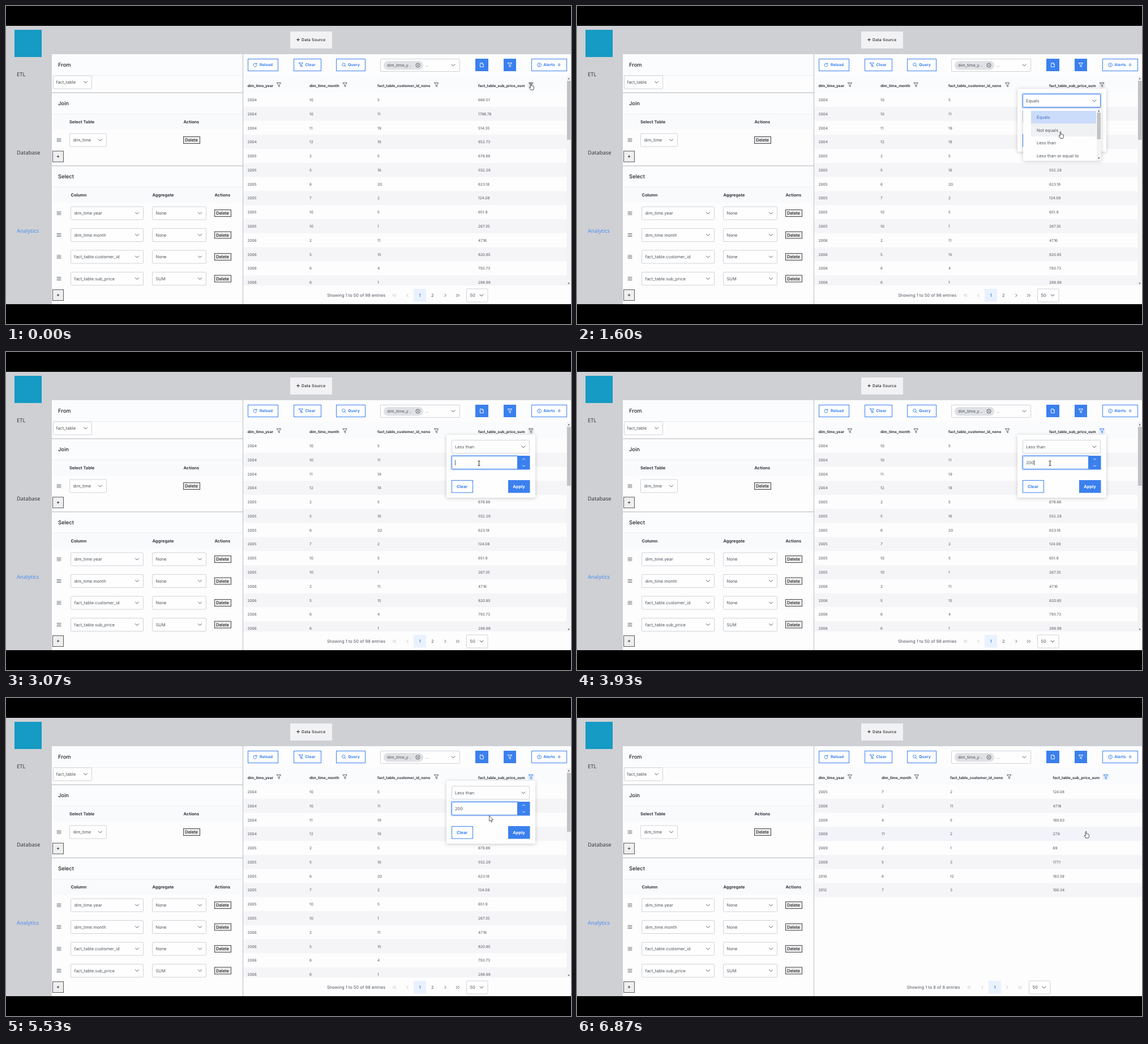
These frames come from a looping animation (998 by 561 pixels, 6.94 s). An HTML page:

```html
<!DOCTYPE html>
<html lang="en">
<head>
<meta charset="utf-8">
<title>Query builder</title>
<style>
html, body { margin: 0; width: 100%; height: 100%; overflow: hidden; background: #000; }
svg { display: block; width: 100vw; height: 100vh; font-family: Inter, sans-serif; text-rendering: geometricPrecision; }
text { white-space: pre; }
.side { font-family: "Noto Sans", sans-serif; }
.shade { filter: drop-shadow(0 1px 3px #0003); }
</style>
</head>
<body>
<svg viewBox="0 0 998 561"><g id="base"></g><g id="live"></g></svg>
<script>
const LOOP = 6940, FPS = 15;
const BLUE = '#3b80ee', INK = '#50565d', DARK = '#343a40', EDGE = '#d0d3d8';

// y is the middle of the capitals
const text = (x, y, s, size = 7.5, fill = INK, weight = 400, more = '') =>
  `<text x="${x}" y="${y + size * .36}" font-size="${size}" fill="${fill}" font-weight="${weight}" ${more}>${s}</text>`;
const bold = (x, y, s, size = 7.4, fill = DARK) => text(x, y, s, size, fill, 700);
const box = (x, y, w, h, fill, stroke = 'none', rx = 0, lw = 1) =>
  `<rect x="${x}" y="${y}" width="${w}" height="${h}" rx="${rx}" fill="${fill}" stroke="${stroke}" stroke-width="${lw}"/>`;
const line = (x, y, d, stroke = INK, lw = 1, fill = 'none') =>
  `<path transform="translate(${x} ${y})" d="${d}" fill="${fill}" stroke="${stroke}" stroke-width="${lw}" stroke-linejoin="round" stroke-linecap="round"/>`;
const ring = (x, y, r, stroke, lw = .9) => `<circle cx="${x}" cy="${y}" r="${r}" fill="none" stroke="${stroke}" stroke-width="${lw}"/>`;
const chevron = (x, y, c = INK) => line(x, y, 'M-3-1.5L0 1.5L3-1.5', c);
const funnel = (x, y, c = INK) => line(x, y, 'M-3.5-3.5H3.5L1 0V3.5L-1 2.4V0Z', c, .9);
const triangle = (x, y, s) => line(x, y, `M-1.6 ${s}H1.6L0 ${-s}Z`, 'none', 0, '#555');
const arrows = (x, y, dir, count, c) =>
  [...Array(count)].map((_, i) => line(x + (count > 1 ? i * 3.2 - 1.6 : 0), y, `M${-dir}-2.3L${dir} 0L${-dir} 2.3`, c, .9)).join('');
const select = (x, y, w, s, pad = 6.5, fill = '#fefefe') =>
  box(x + .5, y - 11.5, w - 1, 23, fill, EDGE, 1.5) + text(x + pad, y, s) + chevron(x + w - 11.5, y);
const remove = (x, y) => box(x + .5, y - 6, 29, 12, '#ececed', '#44474b') + text(x + 3, y, 'Delete', 7.5, '#222', 500);
const plus = y => box(82.5, y - 9.5, 19, 19, '#efeff0', '#55585c') + line(92, y, 'M-1.8 0H1.8M0-1.8V1.8', '#222', .9);
const grip = y => line(93.5, y, 'M-3.5-2.5H3.5M-3.5 0H3.5M-3.5 2.5H3.5', '#555b62', .9);
const button = (x, w, s, pad) => box(x + .5, 93.5, w, 21, '#fefefe', BLUE) + bold(x + pad, 103.7, s, 6.9, BLUE);

function sidebar() {
  return box(0, 35, 998, 491, '#cfd0d4') +
    box(15, 42, 48, 48, '#159bc4') +
    [['ETL', 121, '#35383c'], ['Database', 258.5, '#35383c'], ['Analytics', 397, '#4c8df0']]
      .map(([s, y, c]) => text(19, y, s, 9.4, c, 400, 'class="side"')).join('') +
    box(502, 45, 74, 30, '#f2f2f5') + line(516, 59.5, 'M-2.4 0H2.4M0-2.4V2.4', '#222') +
    text(522, 59.7, 'Data Source', 6.8, '#222', 500, 'letter-spacing=".25"');
}

function builder() {
  const sections = [['From', 86, 153], ['Join', 154, 282], ['Select', 283, 526]].map(([s, top, end]) =>
    box(83, top + 1, 334, 35, '#fbfcfd') + box(83, top + 36, 334, .8, '#e8ecf0') +
    text(92, top + 17.5, s, 9.3, '#222', 500) + (end < 526 ? box(81, end - .5, 337, 1, '#aeb1b5') : '')).join('');
  const columns = [['dim_time.year', 'None'], ['dim_time.month', 'None'], ['fact_table.customer_id', 'None'], ['fact_table.sub_price', 'SUM']];
  return box(81, 85, 917, 441, '#fdfdfe') + sections +
    select(83, 134.5, 69, 'fact_table', 5.5) +
    box(83, 191, 334, 27, '#f9fafc') + bold(112, 204.3, 'Select Table') + bold(313.5, 204.3, 'Actions') +
    grip(236.5) + select(112, 236.5, 66, 'dim_time') + remove(313, 236.5) + plus(265.5) +
    box(83, 320, 334, 27, '#f9fafc') + bold(114.5, 333.3, 'Column') + bold(258.5, 333.3, 'Aggregate') + bold(368.5, 333.3, 'Actions') +
    columns.map(([name, agg], i) => {
      const y = 365.5 + i * 38.5;
      return grip(y) + select(114, y, 129, name) + select(258, y, 96, agg) + remove(368, y);
    }).join('') + plus(510) + box(418, 85, 1, 441, '#b9bcc0');
}

function toolbar() {
  return button(427, 53, 'Reload', 21) + line(440, 104, 'M2.6-1.4A3 3 0 1 0 2.9 1M2.8-3.2V-1.2H.8', BLUE) +
    button(508, 48, 'Clear', 20.5) + funnel(521, 103.7, BLUE) + line(521, 103.7, 'M-3.5-3.5L3.5 3.5', BLUE, .9) +
    button(583, 51, 'Query', 21) + ring(596.3, 103.2, 2.7, BLUE) + line(598.3, 105.2, 'M0 0L2 2', BLUE) +
    box(661.5, 93.5, 140, 22, '#fefefe', EDGE, 1.5) + box(667, 97, 70, 15.5, '#dfe1e5', 'none', 7.7) +
    text(673, 104.6, 'dim_time_y...', 7.3) + ring(727.5, 104.5, 3.6, INK) + line(727.5, 104.5, 'M-1.3-1.3L1.3 1.3M1.3-1.3L-1.3 1.3', INK, .8) +
    text(740.5, 104.6, '...') + chevron(790, 104.3) +
    box(829, 93, 23, 22, BLUE) + line(840.5, 104, 'M-2.6-3.5H.8L2.8-1.5V3.5H-2.6ZM.6-3.4V-1.3H2.7', '#fff', .9) +
    box(879, 93, 22, 22, BLUE) + funnel(890, 104, '#fff') +
    button(928, 62, 'Alerts', 21.3) + bold(975, 103.7, '0', 6.2, BLUE) +
    ring(942, 104, 3.4, BLUE) + line(942, 104, 'M0-1.6V.4M0 1.6V1.7', BLUE);
}

const rows = s => s.split('|').map(r => r.split(' '));
const ALL = rows('2004 10 5 666.51|2004 10 11 1796.76|2004 11 19 514.35|2004 12 18 852.73|2005 2 5 678.88|2005 5 16 552.29|2005 6 20 623.18|' +
  '2005 7 2 124.08|2005 10 5 651.9|2005 10 1 267.35|2006 2 11 47.16|2006 5 15 820.85|2006 6 4 793.73|2006 6 1 288.99');
const FEW = rows('2005 7 2 124.08|2006 2 11 47.16|2008 4 5 180.63|2008 11 2 27.6|2009 2 1 69|2009 5 3 177.1|2010 6 12 183.39|2012 7 3 100.34');
const HEADS = ['dim_time_year', 'dim_time_month', 'fact_table_customer_id_none', 'fact_table_sub_price_sum'];

function table(done, filtered) {
  const xs = done ? [426.5, 538, 659, 840.5] : [426.5, 536, 656, 834];
  const icons = done ? [482, 600, 763.3, 934] : [482, 598.7, 760.3, 927.3];
  const width = done ? 579 : 571, step = 24.78;
  let out = box(419, 123, width, 30, '#fafbfc') + box(icons[3] - 6, 133, 12, 12, filtered ? '#e6eefc' : '#ebecef', 'none', 5);
  HEADS.forEach((s, i) => {
    out += bold(xs[i], 140.3, s, 6.5) + funnel(icons[i], 139, i == 3 && filtered ? BLUE : INK);
  });
  (done ? FEW : ALL).forEach((row, i) => {
    const top = 153 + i * step;
    if (i % 2) out += box(419, top, width, Math.min(step, 493 - top), done && i == 3 ? '#f3f4fa' : '#f5f5f8');
    row.forEach((s, k) => out += text(xs[k], top + 12.6, s, 6.55));
  });
  if (!done) out += box(990, 123, 8, 370, '#f3f3f4') + box(991, 132, 6.5, 104, '#c1c2c4') + triangle(994, 128, 1.2) + triangle(994, 489.5, -1.2);
  return out + pager(done);
}

function pager(done) {
  const [label, first, prev, page, next, last, size] = done ? [582.5, 692.5, 716, 727, 760, 782.5, 798] : [567, 686, 709, 720, 776, 798, 813];
  const dim = '#b4b8bd', live = done ? dim : INK;
  return text(label, 510.5, done ? 'Showing 1 to 8 of 8 entries' : 'Showing 1 to 50 of 98 entries') +
    arrows(first, 510.5, -1, 2, dim) + arrows(prev, 510.5, -1, 1, dim) +
    box(page, 499, 22, 22.5, '#eaf1fe') + text(page + 11, 510.5, '1', 7.5, BLUE, 600, 'text-anchor="middle"') +
    (done ? '' : text(751, 510.5, '2')) + arrows(next, 510.5, 1, 1, live) + arrows(last, 510.5, 1, 2, live) +
    select(size, 510.5, 38.5, '50');
}

// Moments of the interaction, ms
const SHOW = 333, OPEN = 1200, PICK = 2133, FOCUS = 2660, KEYS = [3533, 3733, 3866], BLUR = 5930, CLOSE = 6660, DONE = 6730;
const PATH = [[0, 927, 136], [267, 927, 136], [400, 924, 142], [667, 924, 142], [1067, 858, 168], [1267, 856, 169],
  [1533, 854, 221], [1667, 854, 222], [1933, 846, 243], [2200, 846, 243], [2533, 835, 196], [5267, 835, 196],
  [5800, 894, 234], [6400, 894, 234], [6667, 899, 235], [LOOP, 899, 235]];
const clamp = v => Math.max(0, Math.min(1, v));

function pointer(t) {
  const i = PATH.findIndex(p => p[0] > t), [t0, x0, y0] = PATH[i - 1], [t1, x1, y1] = PATH[i];
  const u = (t - t0) / (t1 - t0), e = u * u * (3 - 2 * u);
  return [x0 + (x1 - x0) * e, y0 + (y1 - y0) * e];
}

function field(x, y, w, h, focus) {
  return (focus ? box(x - 1, y - 1, w + 2, h + 2, 'none', '#bcd3fa', 2, 1.5) : '') +
    box(x + .5, y + .5, w - 1, h - 1, '#fefefe', focus ? BLUE : EDGE, 1.5);
}

function popup(t, x, y) {
  const typed = KEYS.filter(k => k <= t), typing = t >= FOCUS && t < BLUR;
  const since = t - (typed.at(-1) ?? FOCUS);
  const p = clamp((t - SHOW + 67) / 133) * clamp((DONE - t) / 70);
  const hover = x > 887 && x < 926 && y > 226 && y < 248;
  let out = `<g class="shade">${box(778, 146, 157, 111, '#fefefe', 'none', 2)}</g>` +
    field(787, 155, 138, 24, t < FOCUS) + text(793, 167.3, t < PICK ? 'Equals' : 'Less than') + chevron(914, 167.3) +
    field(787, 183, 117, 24, typing) + text(793, 195.4, '200'.slice(0, typed.length)) +
    (typing && since % 1000 < 533 ? box(793.3 + typed.length * 4.65, 190.5, .8, 9.5, '#333') : '') +
    box(903.5, 183, 22, 24.5, BLUE) + line(914.5, 189, 'M-2 1L0-1L2 1', '#fff') + line(914.5, 201, 'M-2-1L0 1L2-1', '#fff') +
    box(787.5, 226.5, 37, 21.5, '#fefefe', BLUE) + bold(796, 237.4, 'Clear', 7.4, BLUE) +
    box(887, 226, 38.5, 22.5, hover ? '#2f6de0' : BLUE) + bold(895.3, 237.4, 'Apply', 7.4, '#fff');
  if (t >= OPEN && t < PICK) out += options(y);
  return `<g opacity="${p}" transform="translate(0 146) scale(1 ${.8 + .2 * p}) translate(0 -146)">${out}</g>`;
}

function options(y) {
  return `<g class="shade">${box(788, 181, 138, 92, '#fefefe', 'none', 1.5)}</g>` +
    ['Equals', 'Not equals', 'Less than', 'Less than or equal to'].map((s, i) => {
      const top = 185 + i * 22.6, over = y >= top && y < top + 22.6;
      return (i && !over ? '' : box(802, top, 115, 22.6, i ? '#f0f1f3' : '#cbdcfa')) + text(812, top + 11.4, s, 7.5, i ? INK : '#3f6fc0');
    }).join('') +
    box(918, 181, 7.5, 92, '#f3f3f4') + box(918.5, 188, 6.5, 47, '#c1c2c4') + triangle(921.7, 185, 1.2) + triangle(921.7, 268.5, -1.2);
}

function cursor(t, x, y) {
  const free = t >= SHOW && t < CLOSE && !(t >= OPEN && t < PICK);
  if (free && x < 903 && y > 183 && y < 207)
    return line(x + .5, y + .3, 'M-1.6-4H1.6M0-4V4M-1.6 4H1.6', '#222', .9);
  if (free && y > 207 && y < 226)
    return line(x, y, 'M0 0V9.5L2.2 7.5L3.7 11L5.2 10.3L3.7 7H6.8Z', '#222', .7, '#fff');
  return line(x, y, 'M-.9.9Q0-.7.9.9V4.8Q1.8 3.9 2.6 5Q3.5 4.3 4.2 5.4Q5.3 5 5.4 6.4V9Q5.3 10.6 4.4 12H-.4Q-1.5 9.7-2.9 7.8Q-2.8 6.2-.9 7.7Z', '#222', .8, '#fff');
}

document.getElementById('base').innerHTML = sidebar() + builder() + toolbar();
const live = document.getElementById('live');
let shown = -1;

function draw(now) {
  const tick = Math.floor((now % LOOP) * FPS / 1000 + .02);
  if (tick != shown) {
    shown = tick;
    const t = Math.min(tick * 1000 / FPS, LOOP - 1), [x, y] = pointer(t);
    live.innerHTML = table(t >= DONE, t >= KEYS[0]) + (t >= SHOW && t < DONE ? popup(t, x, y) : '') + cursor(t, x, y);
  }
  requestAnimationFrame(draw);
}
draw(0);
</script>
</body>
</html>
```
